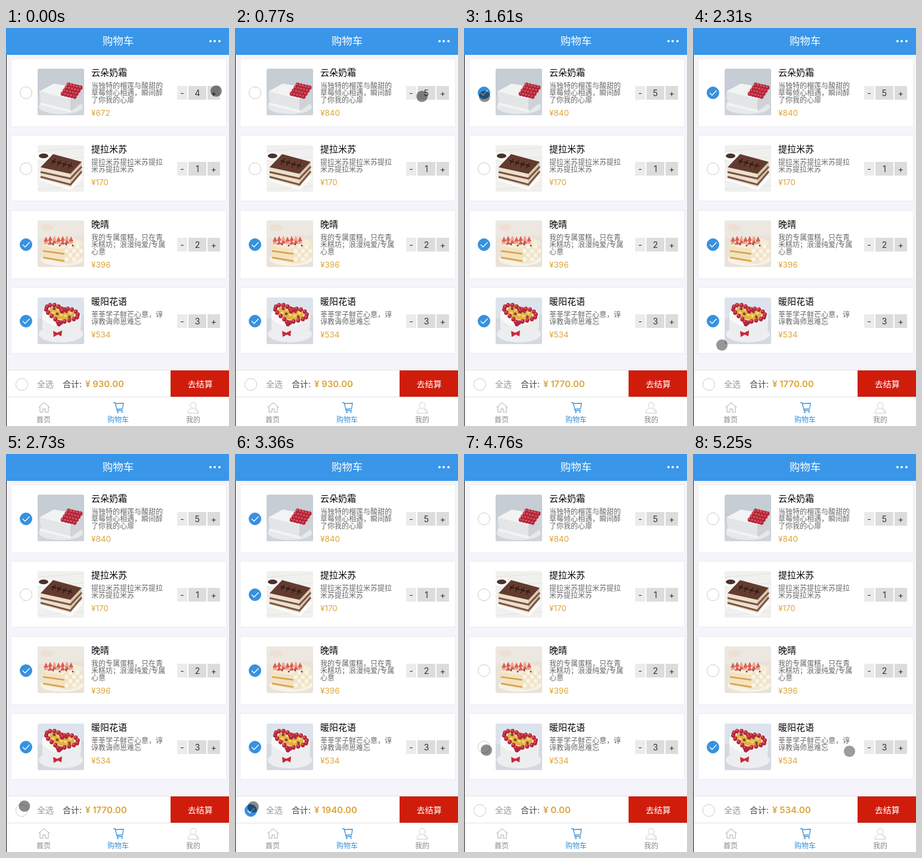
These frames come from a looping animation (374x666 px, 5320 ms). An HTML page:

```html
<!DOCTYPE html>
<html lang="zh-CN">
<head>
<meta charset="utf-8">
<title>购物车</title>
<style>
  html, body { margin: 0; width: 100%; height: 100%; overflow: hidden; }
  body {
    position: relative; background: #f4f4fa; color: #111;
    font: 14px/20px Inter, "Noto Sans CJK SC", "Noto Sans CJK", sans-serif;
  }
  #app { position: absolute; inset: 0 auto auto 0; width: 374px; height: 666px; overflow: hidden; }
  #app * { position: absolute; box-sizing: border-box; white-space: nowrap; }
  #app svg * { position: static; }
  .edge { left: 0; top: 45px; width: 1px; height: 621px; background: #111; }

  header { left: 0; top: 0; width: 374px; height: 45px; background: #3996e8; color: #fff; }
  header b { left: 0; width: 376px; top: 12px; text-align: center; font-weight: 400; font-size: 17.5px; }
  header i { top: 20px; width: 4.2px; height: 4.2px; border-radius: 50%; background: #fff; }

  .card { left: 8px; width: 362px; background: #fff; border: 1px solid #ebebf0; }
  .pic { left: 53px; width: 78px; height: 78px; border-radius: 3px; }
  .name { left: 143px; font-size: 15px; color: #000; }
  .desc { left: 143px; font-size: 12px; line-height: 12px; color: #666; }
  .desc span { left: 0; }
  .price { left: 143px; font-size: 13.5px; color: #dba63c; }
  .step { height: 23px; line-height: 23px; text-align: center; background: #dcdcdc; color: #333; }
  .minus { left: 287px; width: 17px; background: #ebebeb; }
  .qty { left: 306px; width: 30px; }
  .plus { left: 338px; width: 21px; }

  .check { width: 21px; height: 21px; border: 1px solid #c8c8c8; border-radius: 50%; background: #fff; }
  .check svg { left: -1px; top: -1px; width: 21px; height: 21px; visibility: hidden; }
  .check.on { background: #3691df; border-color: #3691df; }
  .check.on svg { visibility: visible; }

  .bar { left: 0; top: 572px; width: 374px; height: 45px; background: #fff; border-top: 1px solid #e4e4e8; }
  .bar span { top: 13px; }
  .total { left: 133px; font-size: 15px; font-weight: 600; color: #dba436; }
  .pay { left: 275.5px; top: 572.5px; width: 98.5px; height: 44.5px; line-height: 45px; padding-left: 2px;
         text-align: center; background: #d01c0b; color: #fff; }

  nav { left: 0; top: 617px; width: 374px; height: 49px; background: #fff; border-top: 1px solid #e2e2e6; }
  nav span { top: 28px; width: 60px; text-align: center; font-size: 12px; color: #888; }
  nav svg { top: 7px; width: 22px; height: 22px; fill: none; stroke: #aaa; }
  nav .active { color: #3990d6; stroke: #3990d6; }

  #dot { left: -9.5px; top: -9.5px; width: 19px; height: 19px; border-radius: 50%; background: #000; }
</style>
</head>
<body>
<div id="app"></div>
<script>
const LOOP = 5320, TICK = 70;

const poly = (points, fill) => `<polygon points="${points}" fill="${fill}"/>`;
const oval = (x, y, rx, ry, fill) => `<ellipse cx="${x}" cy="${y}" rx="${rx}" ry="${ry}" fill="${fill}"/>`;
const line = (d, color, w = 1) => `<path d="${d}" fill="none" stroke="${color}" stroke-width="${w}"/>`;
const shape = (d, fill) => `<path d="${d}" fill="${fill}"/>`;
const backdrop = fill => `<rect width="78" height="78" fill="${fill}"/>`;
const repeat = (n, draw) => Array.from({ length: n }, (_, i) => draw(i)).join('');

const berry = (x, y, r = 3.4) =>
  oval(x, y, r, r * 1.1, '#b5263a') + oval(x - 1, y - 1, r * .45, r * .4, '#dc6069');

function creamCake() {
  return backdrop('#c6cdd4') + poly('0,44 78,36 78,78 0,78', '#ced4d9') +
    oval(39, 64, 37, 12, '#e6e9eb') +
    poly('3,38 55,50 55,72 6,61', '#e4e5e7') + poly('55,50 76,36 75,57 55,72', '#cfd2d6') +
    poly('3,38 27,25 76,33 55,51', '#f2f3f3') +
    repeat(13, i => oval(6 + i * 4, 59 + i, 2.4, 2.2, '#f3f4f4')) +
    poly('52,27 74,32 62,47 42,44', '#a92a3c') +
    repeat(20, i => {
      const col = i % 5, row = Math.floor(i / 5);
      return berry(52 + col * 5 - row * 3.3, 27 + col * 1.2 + row * 5);
    });
}

function layerCake() {
  return backdrop('#f0f0ef') + repeat(5, i => line(`M0 ${10 + i * 16} L78 ${4 + i * 16}`, '#e3e3e2')) +
    oval(10, 19, 13, 7, '#fff') + oval(10, 18, 8, 4, '#4b322c') +
    poly('0,58 32,45 78,52 56,76', '#fbfaf9') +
    poly('5,37 55,47 55,70 5,56', '#ecdfcb') + poly('55,47 74,28 74,47 55,70', '#d9c8b0') +
    line('M5 45 L55 56 L74 36 M5 53 L55 66 L74 44', '#7a5444', 3) +
    poly('5,37 26,15 74,28 55,48', '#633b2e') +
    repeat(4, i => line(`M${24 + i * 9} ${25 + i * 2.4} l7 4 m-1 -6 l-6 9 m0 -5 l7 1`, '#2d1914', 1.4));
}

function fruitCake() {
  return backdrop('#e9e2d8') + poly('0,0 78,0 78,24 0,30', '#ece8e1') +
    oval(16, 12, 11, 6, '#eedfd3') + oval(41, 65, 36, 11, '#f6f2ea') +
    shape('M8 38 Q38 22 75 39 L74 62 Q58 76 42 71 L9 64 Z', '#f1e6cd') +
    poly('9,42 45,46 45,71 9,64', '#f3e3c0') +
    line('M9 51 L45 56 M9 62 L45 68', '#d9a04a', 2.4) +
    oval(42, 38, 33, 9, '#f5ecd8') +
    repeat(18, i => oval(49 + i % 5 * 6, 44 + Math.floor(i / 5) * 7, 3.4, 3.3, i % 2 ? '#fbf5e4' : '#efe3c9')) +
    repeat(14, i => {
      const x = 14 + i % 7 * 7, y = 36 - Math.floor(i / 7) * 5 + Math.sin(i * 2);
      return poly(`${x - 4},${y + 4} ${x},${y - 5} ${x + 4},${y + 3}`, i % 3 ? '#d95f55' : '#eda58f');
    }) + repeat(4, i => oval(26 + i * 11, 40 + i % 2 * 2, 1.5, 1.5, '#694048'));
}

function heartCake() {
  const ring = repeat(26, i => {
    const a = i / 26 * Math.PI * 2;
    const x = 16 * Math.sin(a) ** 3;
    const y = 13 * Math.cos(a) - 5 * Math.cos(2 * a) - 2 * Math.cos(3 * a) - Math.cos(4 * a);
    return berry(40 + x * 1.7, 28 - y, 3.5);
  });
  return backdrop('#dde3ec') + poly('0,35 78,28 78,78 0,78', '#d5d9df') +
    oval(39, 61, 37, 14, '#eceef1') +
    shape('M8 26 Q20 8 40 19 Q64 10 73 29 L72 53 Q58 69 35 69 Q10 64 8 49 Z', '#f8f8f8') +
    shape('M8 36 Q28 53 43 47 Q65 43 73 30 L72 53 Q58 69 35 69 Q10 64 8 49 Z', '#ecedef') +
    `<g transform="rotate(14 40 28)">${oval(40, 26, 22, 11, '#e3b243')}` +
    repeat(10, i => oval(26 + i % 5 * 7, 22 + Math.floor(i / 5) * 7, 2.5, 2.2, i % 3 ? '#f7d867' : '#7d4150')) +
    `${ring}</g>` + poly('26,56 33,59 41,55 40,65 34,62 27,66', '#c62a3c');
}

const items = [
  { y: 68, h: 115, name: '云朵奶霜', unit: 168, qty: 4, art: creamCake,
    desc: ['当独特的榴莲与酸甜的', '草莓倾心相遇，瞬间醉', '了你我的心扉'] },
  { y: 196, h: 111, name: '提拉米苏', unit: 170, qty: 1, art: layerCake,
    desc: ['提拉米苏提拉米苏提拉', '米苏提拉米苏'] },
  { y: 322, h: 115, name: '晚晴', unit: 198, qty: 2, art: fruitCake,
    desc: ['我的专属蛋糕，只在青', '禾糕坊；浪漫纯爱/专属', '心意'] },
  { y: 451, h: 111, name: '暖阳花语', unit: 178, qty: 3, art: heartCake,
    desc: ['莘莘学子鲜芒心意，谆', '谆教诲师恩难忘'] },
];

const check = (x, y) => `<div class="check" style="left:${x}px;top:${y}px">
  <svg viewBox="0 0 21 21">${line('M5 10.5 L9 14.5 L16.5 6.5', '#fff', 1.3)}</svg></div>`;

function row({ y, h, name, desc, qty, art }) {
  const mid = y + 37 + desc.length;
  const step = (kind, label) => `<div class="step ${kind}" style="top:${mid - 11}px">${label}</div>`;
  return `
    <div class="card" style="top:${y - 17}px;height:${h}px"></div>
    ${check(23, mid - 10.5)}
    <svg class="pic" style="top:${y}px" viewBox="0 0 78 78">${art()}</svg>
    <div class="name" style="top:${y - 3}px">${name}</div>
    <div class="desc" style="top:${y + 23}px">
      ${desc.map((s, i) => `<span style="top:${i * 12}px">${s}</span>`).join('')}</div>
    <div class="price" style="top:${y + 28 + desc.length * 12}px"></div>
    ${step('minus', '-')}${step('qty', qty)}${step('plus', '+')}`;
}

const app = document.getElementById('app');
app.innerHTML = `
  <header><b>购物车</b>${[340.5, 348, 355.5].map(x => `<i style="left:${x}px"></i>`).join('')}</header>
  ${items.map(row).join('')}
  <div class="bar">
    <span style="left:52px;color:#999">全选</span>
    <span style="left:95px;color:#444">合计:</span>
    <span class="total"></span>
  </div>
  ${check(16, 586)}
  <div class="pay">去结算</div>
  <nav>
    <svg style="left:53px" viewBox="0 0 22 22"><path d="M1.5 10 L11 2 L20.5 10 M4 8.5 V18 H9 V12.5 H13 V18 H18 V8.5"/></svg>
    <svg class="active" style="left:178px" viewBox="0 0 22 22"><path stroke-width="1.3" d="M2 2 H5 L8.5 15.5 L18 14.5 M6 3.5 L19 3 L17.5 12 L8 13"/><circle cx="9.5" cy="18" r="1.2"/><circle cx="16.5" cy="17.5" r="1.2"/></svg>
    <svg style="left:303px;stroke:#ccc" viewBox="0 0 22 22"><circle cx="11" cy="6.5" r="5"/><path d="M2 19.5 Q2 13 8 12 M14 12 Q20 13 20 19.5 Z M2 19.5 H20"/></svg>
    <span style="left:33px">首页</span>
    <span class="active" style="left:158px">购物车</span>
    <span style="left:284px">我的</span>
  </nav>
  <div class="edge"></div>
  <div id="dot"></div>`;

const all = sel => [...app.querySelectorAll(sel)];
const checks = all('.check'), prices = all('.price'), counts = all('.qty');
const [total] = all('.total'), dot = document.getElementById('dot');

const ease = {
  in: p => p * p,
  out: p => 1 - (1 - p) ** 2,
  both: p => p * p * (3 - 2 * p),
};

// time, x, y, opacity, easing into this point
const touch = [
  [0, 352, 105, .48, 'both'],
  [595, 352, 105, .48, 'both'],
  [770, 313, 114, .45, 'in'],
  [1190, 34, 114, .45, 'out'],
  [1680, 34, 114, .45, 'both'],
  [2310, 48, 530, .41, 'both'],
  [2800, 30, 590, .46, 'out'],
  [3990, 30, 590, .46, 'both'],
  [4480, 37, 495, .46, 'both'],
  [4900, 37, 495, .46, 'both'],
  [5250, 262, 497, .39, 'both'],
  [LOOP, 262, 497, .39, 'both'],
];

function touchAt(t) {
  const i = touch.findIndex(k => k[0] > t);
  const a = touch[i - 1], b = touch[i];
  const p = ease[b[4]]((t - a[0]) / (b[0] - a[0]));
  return [1, 2, 3].map(n => a[n] + (b[n] - a[n]) * p);
}

function setText(el, text) {
  if (el.textContent !== text) el.textContent = text;
}

function render(t) {
  const cleared = t >= 3780, picked = t >= 2940 && !cleared;
  const on = [t >= 1400 && !cleared, picked, !cleared, !cleared || t >= 4900, picked];
  checks.forEach((el, i) => el.classList.toggle('on', on[i]));

  let sum = 0;
  items.forEach((item, i) => {
    const qty = item.qty + (i === 0 && t >= 210 ? 1 : 0);
    const cost = qty * item.unit;
    if (on[i]) sum += cost;
    setText(counts[i], String(qty));
    setText(prices[i], '¥' + cost);
  });
  setText(total, '¥ ' + sum.toFixed(2));

  const [x, y, alpha] = touchAt(t);
  dot.style.transform = `translate(${x}px, ${y}px)`;
  dot.style.opacity = alpha;
}

const start = performance.now();
function frame() {
  const t = (performance.now() - start) % LOOP;
  render(Math.floor(t / TICK) * TICK);
  requestAnimationFrame(frame);
}
frame();
</script>
</body>
</html>
```
